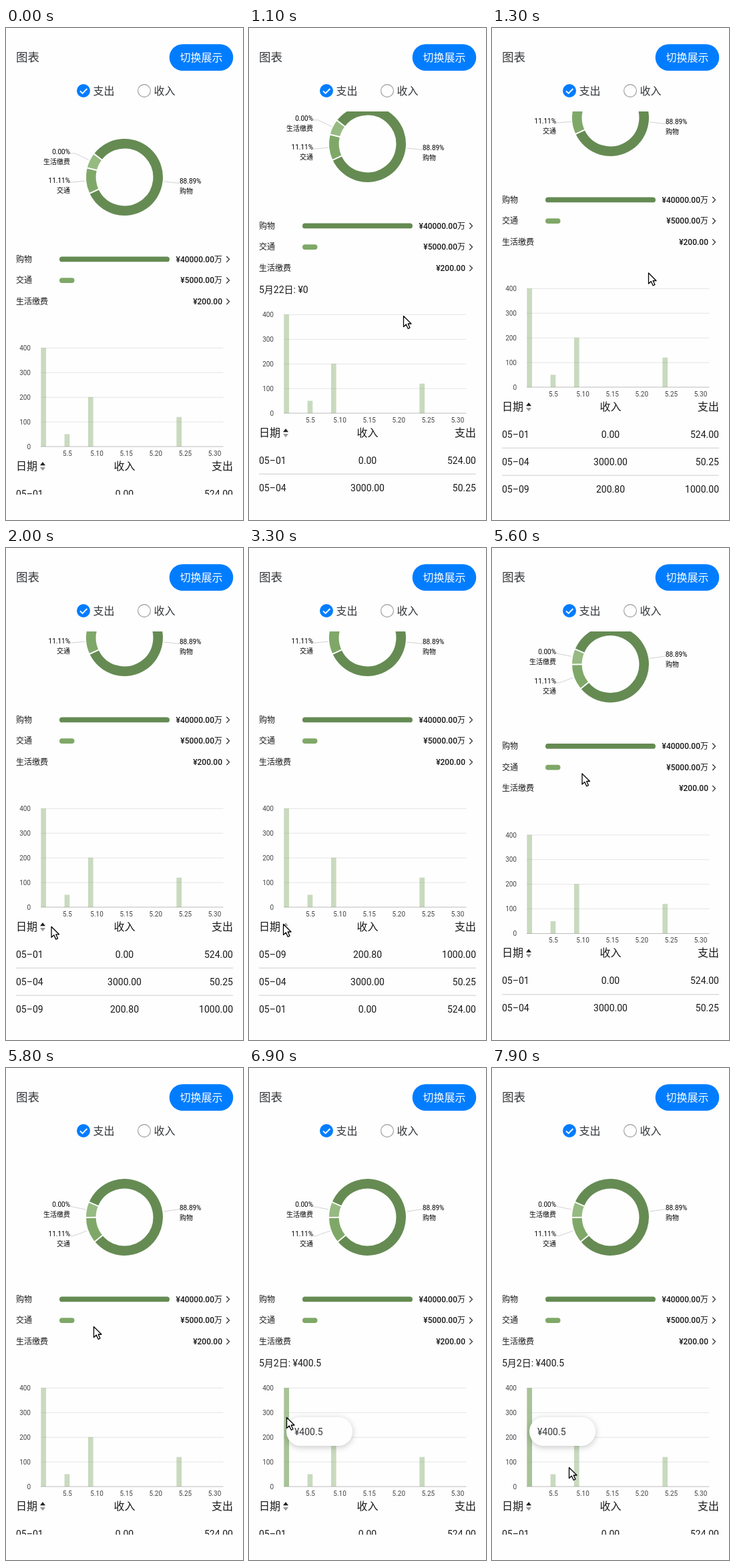
An HTML page for the animation above (8 s loop, 355 px wide and 737 px high).

```html
<!DOCTYPE html>
<html lang="zh-CN">
<head>
<meta charset="utf-8">
<style>
html, body { margin: 0; width: 100%; height: 100%; overflow: hidden; background: #fefefe; }
svg { display: block; }
text { font-family: Roboto, "Noto Sans CJK SC", "Noto Sans CJK", sans-serif; white-space: pre; }
.tip { filter: drop-shadow(0 2px 5px rgba(0, 0, 0, .22)); }
</style>
</head>
<body>
<svg width="355" height="737" viewBox="0 0 355 737">
  <g id="head"></g>
  <svg y="125" width="355" height="574" viewBox="0 125 355 574"><g id="page"></g></svg>
  <path id="cursor" d="M.5.5V16.5L4.3 13 7.2 19.3 10 18 7.2 12H12Z" fill="#fff" stroke="#000" stroke-width="1.3" stroke-linejoin="round"/>
</svg>
<script>
const LOOP = 8000, STEP = 100;
const CX = 177.5, CY = 223.5, ROW = 41, MAX_SCROLL = 89;
const INK = '#1a1a1a', SOFT = '#33363a', PAPER = '#fefefe';
const greens = ['#658b53', '#7fa868', '#96ba82'];
const $ = id => document.getElementById(id);

const clamp = (v, lo, hi) => Math.min(hi, Math.max(lo, v));
const ramp = (t, from, to) => clamp((t - from) / (to - from), 0, 1);
const linear = p => p;
const smooth = p => p * p * (3 - 2 * p);

// Cursor moves: from time, to time, end point, easing
const moves = [
  [100, 500, 237, 560, linear], [700, 1100, 231, 431, linear], [1100, 1500, 237, 302, linear],
  [1500, 2100, 54, 588, smooth], [2100, 2700, 51, 563, smooth], [4700, 5400, 138, 288, smooth],
  [5400, 5800, 131, 387, linear], [5800, 6400, 56, 523, smooth], [7500, 7900, 115, 598, smooth]
];
function cursorAt(t) {
  let x = 308, y = 716;
  for (const [from, to, tx, ty, ease] of moves) {
    const p = ease(ramp(t, from, to));
    x += (tx - x) * p;
    y += (ty - y) * p;
  }
  return [x, y];
}

// The page follows the cursor during the upward drag and the later downward drag
function scrollAt(t) {
  if (t < 1500) return clamp(481 - cursorAt(t)[1], 0, MAX_SCROLL);
  if (t < 5400) return MAX_SCROLL;
  return t < 5800 ? clamp(MAX_SCROLL + 298 - cursorAt(t)[1], 0, MAX_SCROLL) : 0;
}

const text = (x, y, s, size, anchor = 'start', weight = 400, fill = INK) =>
  `<text x="${x}" y="${y + size * .365}" font-size="${size}" font-weight="${weight}" text-anchor="${anchor}" fill="${fill}">${s}</text>`;
const rect = (x, y, w, h, fill, r = 0) =>
  `<rect x="${x}" y="${y}" width="${w}" height="${h}" rx="${r}" fill="${fill}"/>`;
const line = (d, color, width = 1) =>
  `<path d="${d}" fill="none" stroke="${color}" stroke-width="${width}"/>`;
const polar = (r, deg) => {
  const a = deg * Math.PI / 180;
  return [CX + r * Math.cos(a), CY + r * Math.sin(a)];
};

function donut(spin) {
  const slices = [['购物', '88.89%', 297.5], ['交通', '11.11%', 39], ['生活缴费', '0.00%', 23.5]];
  let arcs = '', gaps = '', labels = '', from = 217.5 + spin;
  slices.forEach(([name, share, sweep], i) => {
    const to = from + sweep, mid = from + sweep / 2;
    arcs += line(`M${polar(50.2, from)}A50.2 50.2 0 ${+(sweep > 180)} 1 ${polar(50.2, to)}`, greens[i], 14.6);
    gaps += line(`M${polar(42, from)}L${polar(59, from)}`, PAPER, 2);
    const elbow = polar(82, mid), right = elbow[0] > CX;
    const x = right ? 260 : 96, anchor = right ? 'start' : 'end';
    labels += line(`M${polar(59.5, mid)}L${elbow}H${x}`, '#c4c6c4', .8)
      + text(x, elbow[1] - 2.7, share, 10, anchor, 400, '#000')
      + text(x, elbow[1] + 12.2, name, 10, anchor, 500, '#000');
    from = to;
  });
  return arcs + gaps + labels;
}

function categories() {
  return [['购物', '¥40000.00万', 165], ['交通', '¥5000.00万', 22.5], ['生活缴费', '¥200.00', 0]]
    .map(([name, sum, w], i) => {
      const y = 346.2 + i * 31.7;
      return text(15, y, name, 12) + rect(80, y - 3.7, w, 7.8, greens[i], 3.9)
        + text(324, y, sum, 12, 'end', 500) + line(`M330.3 ${y - 4.2}l4.2 4.4-4.2 4.4`, '#222', 1.2);
    }).join('');
}

function barChart(picked) {
  let s = '';
  for (let v = 0; v <= 400; v += 100) {
    const y = 627 - v * .369;
    s += line(`M52 ${y}H325.5`, v ? '#e4e5e4' : '#bcbcbc') + text(37, y, v, 10, 'end', 400, '#444');
  }
  for (const [day, v] of [[2, 400.5], [6, 50.25], [10, 200.8], [25, 120]]) {
    const h = v * .369;
    s += rect(52.3 + (day - 2) * 8.83, 627 - h, 7.7, h, `rgba(127,168,104,${picked && day === 2 ? .68 : .42})`);
  }
  for (let d = 5; d <= 30; d += 5) s += text(92 + (d - 5) * 8.82, 637, '5.' + d, 10, 'middle', 400, '#444');
  return s;
}

function table(reversed) {
  const rows = [['05–01', '0.00', '524.00'], ['05–04', '3000.00', '50.25'], ['05–09', '200.80', '1000.00']];
  if (reversed) rows.reverse();
  const [up, down] = reversed ? ['#aaa', '#222'] : ['#222', '#999'];
  const cells = ([date, income, spent], y, size, weight) => text(15, y, date, size, 'start', weight)
    + text(CX, y, income, size, 'middle', weight) + text(340, y, spent, size, 'end', weight);
  return cells(['日期', '收入', '支出'], 656, 16, 500)
    + `<path d="M51 655.3L55 650l4 5.3z" fill="${up}"/><path d="M51 658L55 663.3l4-5.3z" fill="${down}"/>`
    + rows.map((r, i) => cells(r, 697.5 + i * ROW, 14, 400)
      + (i ? rect(15, 676.5 + i * ROW, 325, 1.5, '#dcdddc') : '')).join('');
}

function render(t) {
  const picked = t >= 6900;
  const note = picked ? '5月2日: ¥400.5' : t >= 900 && t < 1300 ? '5月22日: ¥0' : '';
  $('page').setAttribute('transform', `translate(0 ${-scrollAt(t)})`);
  $('page').innerHTML = donut(-14.5 * ramp(t, 5400, 5600)) + categories() + text(15, 441.5, note, 14)
    + barChart(picked) + table(t >= 3200 && t < 4400)
    + (picked ? `<g class="tip">${rect(56, 523, 99, 43, PAPER, 21)}</g>` + text(68, 545, '¥400.5', 14, 'start', 400, SOFT) : '');
  $('cursor').setAttribute('transform', `translate(${cursorAt(t)})`);
  $('cursor').style.display = t < 100 ? 'none' : '';
}

$('head').innerHTML = text(15, 44, '图表', 17.5, 'start', 500, SOFT)
  + rect(244.7, 24.2, 95.6, 39.8, '#007dff', 19.9) + text(292.5, 44, '切换展示', 16, 'middle', 500, '#fff')
  + '<circle cx="116" cy="94" r="10" fill="#007dff"/>' + line('M111 94.3l3.6 3.7 6.8-7', '#fff', 1.9)
  + text(130.5, 94, '支出', 16, 'start', 400, SOFT)
  + '<circle cx="207" cy="94" r="9.4" fill="none" stroke="#999" stroke-width="1.1"/>'
  + text(221.5, 94, '收入', 16, 'start', 400, SOFT);

let last = -1;
const start = performance.now();
function tick() {
  const t = Math.floor((performance.now() - start) % LOOP / STEP) * STEP;
  if (t !== last) render(last = t);
  requestAnimationFrame(tick);
}
tick();
</script>
</body>
</html>
```
